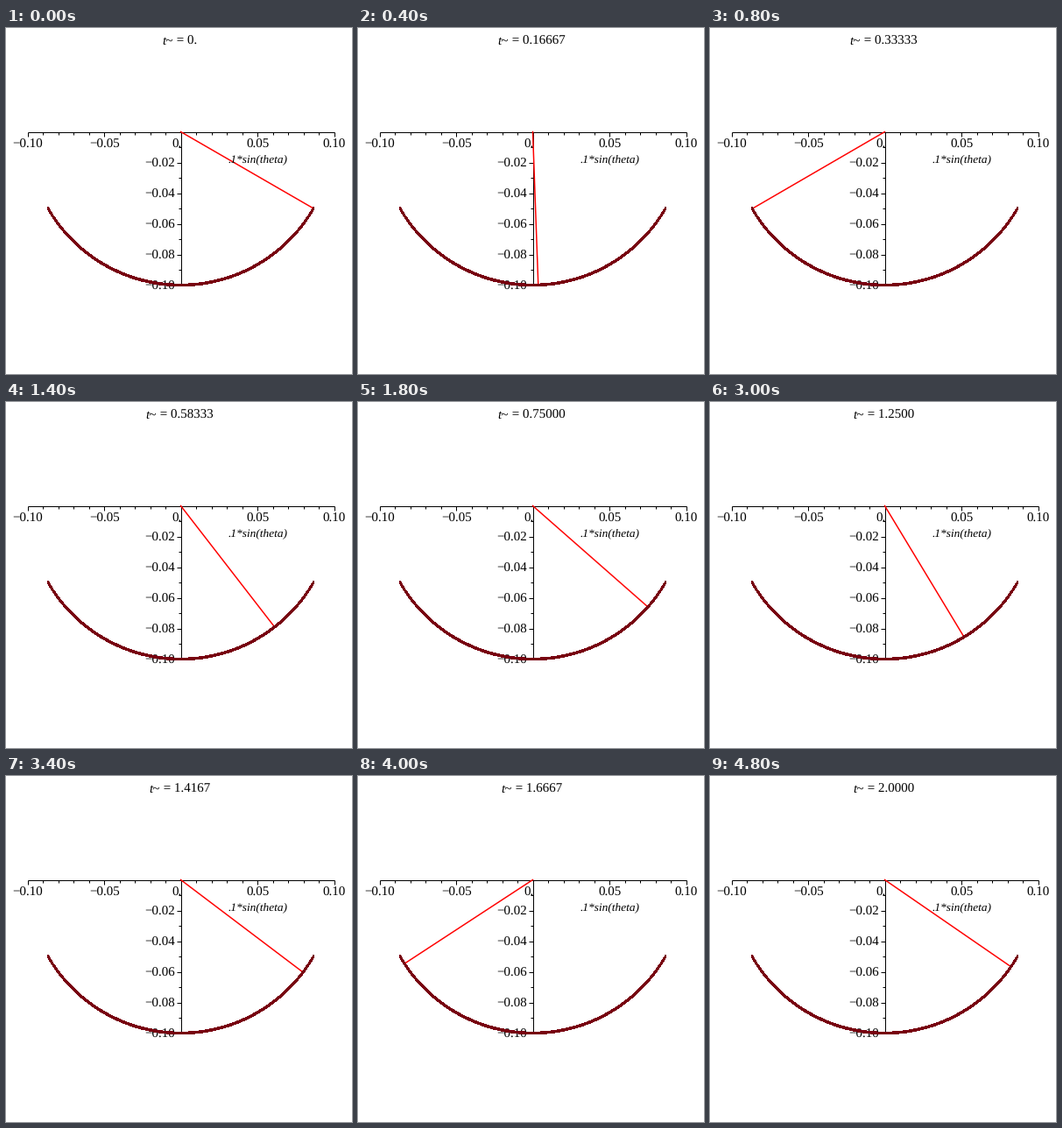
A matplotlib script for the animation above (5000 ms loop, 395 by 395 pixels).

```python
import matplotlib.pyplot as plt
import numpy as np
from matplotlib.animation import FuncAnimation

SIZE, DPI = 395, 100
FRAMES, INTERVAL = 25, 200
X0, Y0, SCALE = 199.5, 118.5, 1750   # pivot in pixels, pixels per metre
LENGTH, GRAVITY, START = 0.1, 9.8, np.pi / 3
REACH = LENGTH * SCALE
FONT_PX = 15
MAROON = "#780010"

plt.rcParams.update({
    "font.family": "Liberation Serif",
    "text.hinting": "none",
    "text.hinting_factor": 8,
})


def pt(px):
    return px * 72 / DPI


def swing_angles(count, step, substeps=200):
    """Angle of the large-amplitude pendulum at each step, by leapfrog."""
    h = step / substeps
    angle, speed = START, 0.0
    angles = [angle]
    for _ in range(count - 1):
        for _ in range(substeps):
            speed -= h / 2 * GRAVITY / LENGTH * np.sin(angle)
            angle += h * speed
            speed -= h / 2 * GRAVITY / LENGTH * np.sin(angle)
        angles.append(angle)
    return angles


fig = plt.figure(figsize=(SIZE / DPI, SIZE / DPI), dpi=DPI, facecolor="white")
ax = fig.add_axes([0, 0, 1, 1])
ax.set(xlim=(0, SIZE), ylim=(SIZE, 0))
ax.axis("off")


def segment(xs, ys, color="black", width=1.0, **kw):
    return ax.plot(xs, ys, color=color, lw=pt(width), **kw)[0]


def write(x, y, text, px=FONT_PX, **kw):
    return ax.text(x, y, text, fontsize=pt(px), va="baseline", zorder=3, **kw)


def number(value):
    return f"{value:.2f}".replace("-", "\u2212")


def draw_axes():
    axis = dict(snap=True, zorder=1, solid_capstyle="butt")
    segment([X0 - REACH, X0 + REACH], [Y0, Y0], **axis)
    segment([X0, X0], [Y0, Y0 + REACH], **axis)
    for k in range(-10, 11):
        x = X0 + k * SCALE / 100
        major = k % 5 == 0
        segment([x, x], [Y0, Y0 + (5 if major else 3)], **axis)
        if major and k:
            write(x + 0.5, 137, number(k / 100), ha="center")
    write(189, 137, "0.")
    for k in range(1, 11):
        y = Y0 + k * SCALE / 100
        major = k % 2 == 0
        segment([X0 - (5 if major else 3), X0], [y, y], **axis)
        if major:
            write(193, y + 5, number(-k / 100), ha="right")


def draw_arc():
    a = np.linspace(-START, START, 200)
    x = X0 + REACH * np.sin(a)
    y = Y0 + REACH * np.cos(a)
    for shift in (-0.7, 0, 0.7):
        segment(x, y + shift, MAROON, 1.1, zorder=4, antialiased=False)


draw_axes()
draw_arc()
write(253, 153, ".1*sin(theta)", 13.4, style="italic")

rod = segment([], [], "red", 1.5, zorder=2)
symbol = write(0, 19, "t~", style="italic")
reading = write(0, 19, "")
angles = swing_angles(FRAMES, 1 / 12)


def update(i):
    t = i / 12
    value = f"{t:#.5g}" if i else "0."
    # widths in em: italic symbol, " = ", then half an em per digit
    width = FONT_PX * (0.82 + 1.064 + 0.25 + 0.5 * (len(value) - 1))
    left = 198 - width / 2
    symbol.set_x(left)
    reading.set_x(left + 0.82 * FONT_PX)
    reading.set_text(" = " + value)
    rod.set_data([X0, X0 + REACH * np.sin(angles[i])],
                 [Y0, Y0 + REACH * np.cos(angles[i])])
    return rod, symbol, reading


anim = FuncAnimation(fig, update, frames=FRAMES, interval=INTERVAL,
                     repeat=True, repeat_delay=0, blit=False)
plt.show()
```
